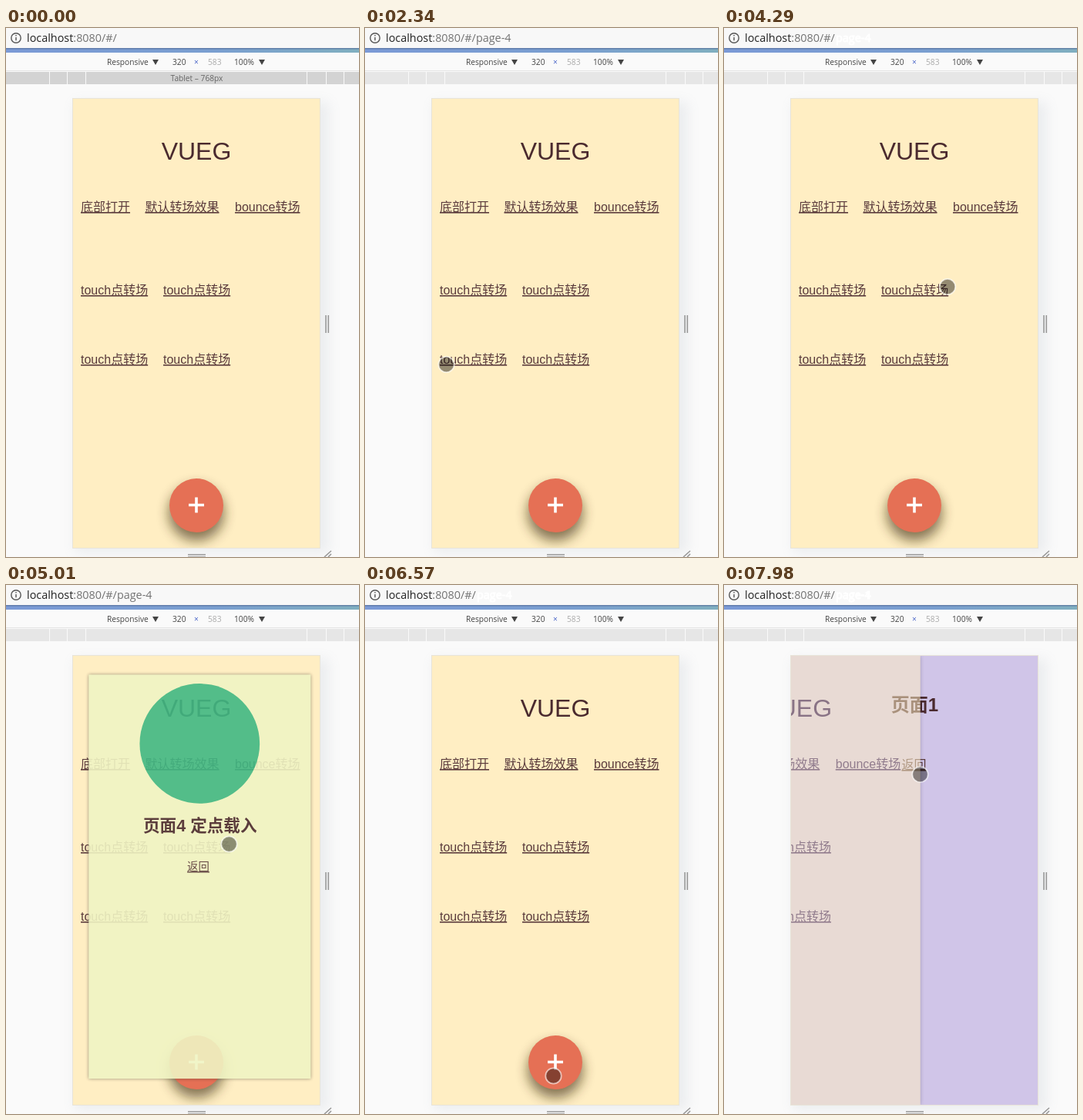
These frames come from a looping animation (458 px wide and 687 px high, 8000 ms). An HTML page:

```html
<!DOCTYPE html>
<html lang="zh-CN">
<head>
<meta charset="utf-8">
<title>Page transitions</title>
<style>
  html, body { margin: 0; width: 100%; height: 100%; overflow: hidden; background: #fafafa; }
  svg { display: block; width: 458px; height: 687px; }
  text { white-space: pre; }
  .ui { font: 10.2px "Open Sans", "Noto Sans", sans-serif; fill: #444; }
  .url { font: 14.4px "Open Sans", "Noto Sans", sans-serif; fill: #737373; }
  .page text { font: 16px "Liberation Sans", "Noto Sans CJK SC", "Noto Sans CJK", sans-serif; fill: #4a2a2e; }
  .page .link { text-decoration: underline; fill: #5a3b3c; }
  .page .big { font-size: 32px; text-anchor: middle; }
  .page .head { font-size: 24px; font-weight: 700; text-anchor: middle; }
  .moving .bg { filter: drop-shadow(0 0 2.5px rgba(0, 0, 0, .45)); }
</style>
</head>
<body>
<svg viewBox="0 0 458 687">
  <defs>
    <linearGradient id="bar">
      <stop offset="0" stop-color="#7b9ad6"/>
      <stop offset=".6" stop-color="#7a9fd0"/>
      <stop offset="1" stop-color="#80afc0"/>
    </linearGradient>
    <clipPath id="screen"><rect x="87" y="92" width="320" height="583"/></clipPath>
    <filter id="soft" x="-50%" y="-50%" width="200%" height="200%"><feGaussianBlur stdDeviation="8"/></filter>
  </defs>

  <rect width="458" height="687" fill="#fafafa"/>

  <!-- address bar -->
  <rect width="458" height="26" fill="#f8f8f8"/>
  <g stroke="#555" fill="none" stroke-width="1.4">
    <circle cx="13" cy="13" r="6.2"/>
    <path d="M13 12v4.2M13 9v1.6"/>
  </g>
  <text class="url" x="27" y="18"><tspan fill="#222">localhost</tspan>:8080/#/<tspan id="path"></tspan></text>
  <g id="ghost" class="url" style="fill:#fff;stroke:#fff;stroke-width:.9"><text x="145" y="18">page-4</text><text id="ghost1" x="145" y="18">page-1</text></g>
  <rect y="26" width="458" height="6" fill="url(#bar)"/>
  <rect y="26" width="458" height="1.5" fill="#566f9c" opacity=".7"/>

  <!-- device toolbar -->
  <rect y="32" width="458" height="24" fill="#fafafa"/>
  <rect y="55" width="458" height="1" fill="#e3e3e3"/>
  <g class="ui">
    <text x="131" y="48">Responsive</text>
    <text x="216" y="48">320</text>
    <text x="244" y="48" style="fill:#4a66c8">×</text>
    <text x="262" y="48" style="fill:#aaa">583</text>
    <text x="296" y="48">100%</text>
    <path d="M190 41h8l-4 7zM328 41h8l-4 7z"/>
  </g>
  <g id="ruler"></g>
  <text id="label" class="ui" x="247.5" y="69" text-anchor="middle" style="fill:#666">Tablet – 768px</text>

  <!-- device -->
  <rect x="89" y="96" width="330" height="586" fill="#8a98a8" opacity=".13" filter="url(#soft)"/>
  <rect x="86.5" y="91.5" width="321" height="584" fill="#fff" stroke="#e8e4d8"/>
  <g stroke="#999" stroke-width="1.6">
    <path d="M415 373v23M418.3 373v23M236 684h23M236 687h23M413 687l9-8M418 687l4-4"/>
  </g>

  <g clip-path="url(#screen)">
    <g id="under"></g>
    <g id="over"></g>
    <g id="dot">
      <circle r="10" fill="#000" fill-opacity=".42"/>
      <circle r="10.2" fill="none" stroke="#fff" stroke-opacity=".6" stroke-width="1.8"/>
    </g>
  </g>
</svg>
<script>
const $ = id => document.getElementById(id);
const LOOP = 8000, STEP = 30;
const clamp = v => Math.min(1, Math.max(0, v));
const smooth = v => v * v * (3 - 2 * v);

// CSS "ease": cubic-bezier(.25, .1, .25, 1)
function ease(x) {
  let lo = 0, hi = 1, u = x;
  for (let i = 0; i < 20; i++) {
    u = (lo + hi) / 2;
    const bx = .75 * u * (1 - u) ** 2 + .75 * u * u * (1 - u) + u ** 3;
    if (bx < x) lo = u; else hi = u;
  }
  return .3 * u * (1 - u) ** 2 + 3 * u * u * (1 - u) + u ** 3;
}

const bg = fill => `<rect class="bg" x="87" y="92" width="320" height="583" fill="${fill}"/>`;
const text = (cls, x, y, s) => `<text class="${cls}" x="${x}" y="${y}">${s}</text>`;
const link = (x, y, s) => text('link', x, y, s);
const touch = y => link(97, y, 'touch点转场') + link(204, y, 'touch点转场');

const pages = {
  home: bg('#ffeec3') + text('big', 247, 171, 'VUEG') +
    link(97, 238, '底部打开') + link(180.5, 238, '默认转场效果') + link(297, 238, 'bounce转场') +
    touch(346) + touch(436),
  four: bg('#f0f4c3') + '<circle cx="247" cy="191.5" r="86.5" fill="#41b883"/>' +
    text('head', 247.5, 318, '页面4 定点载入') + link(229, 375, '返回'),
  one: bg('#d0c5e8') + text('head', 247.5, 164, '页面1') + link(230.5, 239, '返回')
};
const fab = '<circle cx="247" cy="630" r="36" fill="#3b2a10" opacity=".62" filter="url(#soft)"/>' +
  '<circle cx="247" cy="620" r="35" fill="#e57055"/>' +
  '<path d="M237 619.5h20M247 609.5v20" stroke="#fff" stroke-width="3.6"/>';

// Pointer stops: time, x, y
const stops = [
  [30, 248, 84], [510, 246, 644], [810, 262, 519], [1230, 246, 412], [1620, 157, 433],
  [1710, 157, 433], [2130, 105.5, 437], [2910, 105.5, 437], [3390, 236.5, 374],
  [3840, 236.5, 374], [4290, 290, 336], [4980, 290, 336], [5400, 253.5, 370.5],
  [6240, 253.5, 370.5], [6570, 244.5, 637.5], [7140, 244.5, 637.5],
  [7590, 258, 275], [7800, 254.5, 246]
];
function pointer(t) {
  const i = stops.findIndex(s => s[0] > t);
  if (i < 0) return stops[stops.length - 1].slice(1);
  if (!i) return [248, 60];
  const [t0, x0, y0] = stops[i - 1], [t1, x1, y1] = stops[i];
  const k = smooth((t - t0) / (t1 - t0));
  return [x0 + (x1 - x0) * k, y0 + (y1 - y0) * k];
}

// Each visit: when it opens, stalls and closes, when home slides back, and the touch point
const visits = [
  { page: 'four', path: 'page-4', open: 2340, close: 3570, back: 3600, x: 105.5, y: 437 },
  { page: 'four', path: 'page-4', open: 4560, stall: 4800, wait: 150, close: 5670, back: 5700, x: 290, y: 336 },
  { page: 'one', path: 'page-1', open: 6810, close: 7890, back: 7925, x: 244.5, y: 637.5 }
];

function grown(v, t) {
  if (v.stall && t > v.stall) t = Math.max(v.stall, t - v.wait);
  return clamp((t - v.open - 30) / 300);
}

function put(el, page, withFab) {
  const key = page + withFab;
  if (el.dataset.key === key) return;
  el.dataset.key = key;
  el.innerHTML = page ? `<g class="page">${pages[page]}${withFab ? fab : ''}</g>` : '';
}

function layer(under, hasFab, over = '', transform = '', opacity = 1) {
  put($('under'), under, hasFab);
  const el = $('over');
  put(el, over, false);
  el.setAttribute('class', over ? 'moving' : '');
  el.setAttribute('transform', transform);
  el.setAttribute('opacity', opacity);
}

function drawRuler(hover) {
  const edges = [0, 57, 80, 104, 391, 416, 439, 459];
  $('ruler').innerHTML = edges.slice(1).map((x, i) =>
    `<rect x="${edges[i]}" y="57" width="${x - edges[i] - 1}" height="16" fill="${hover ? '#d3d3d3' : '#e6e6e6'}"/>`
  ).join('');
  $('label').setAttribute('visibility', hover ? 'visible' : 'hidden');
}

let hovered = null;
function render(ms) {
  const t = Math.floor(ms / STEP) * STEP;
  const hover = t < 30;
  if (hover !== hovered) drawRuler(hovered = hover);

  const v = visits.filter(o => o.open <= t).pop();
  const visiting = v && t < v.close;
  $('path').textContent = visiting ? v.path : '';
  $('ghost').setAttribute('visibility', v && !visiting ? 'visible' : 'hidden');
  $('ghost1').setAttribute('display', v && v.page === 'one' ? 'inline' : 'none');

  const p = v ? grown(v, t) : 0;
  const q = v ? ease(clamp((t - v.back) / 180)) : 0;
  if (!v || p === 0 || t >= v.back + 210) layer('home', true);
  else if (p < 1) layer('home', true, v.page, `translate(${v.x} ${v.y}) scale(${p}) translate(${-v.x} ${-v.y})`, p);
  else if (t <= v.back) layer(v.page, false);
  else layer(v.page, false, 'home', `translate(${-320 * (1 - q)})`, q);

  $('dot').setAttribute('transform', `translate(${pointer(t).join(' ')})`);
}

const start = performance.now();
function tick() {
  render((performance.now() - start) % LOOP);
  requestAnimationFrame(tick);
}
render(0);
requestAnimationFrame(tick);
</script>
</body>
</html>
```
